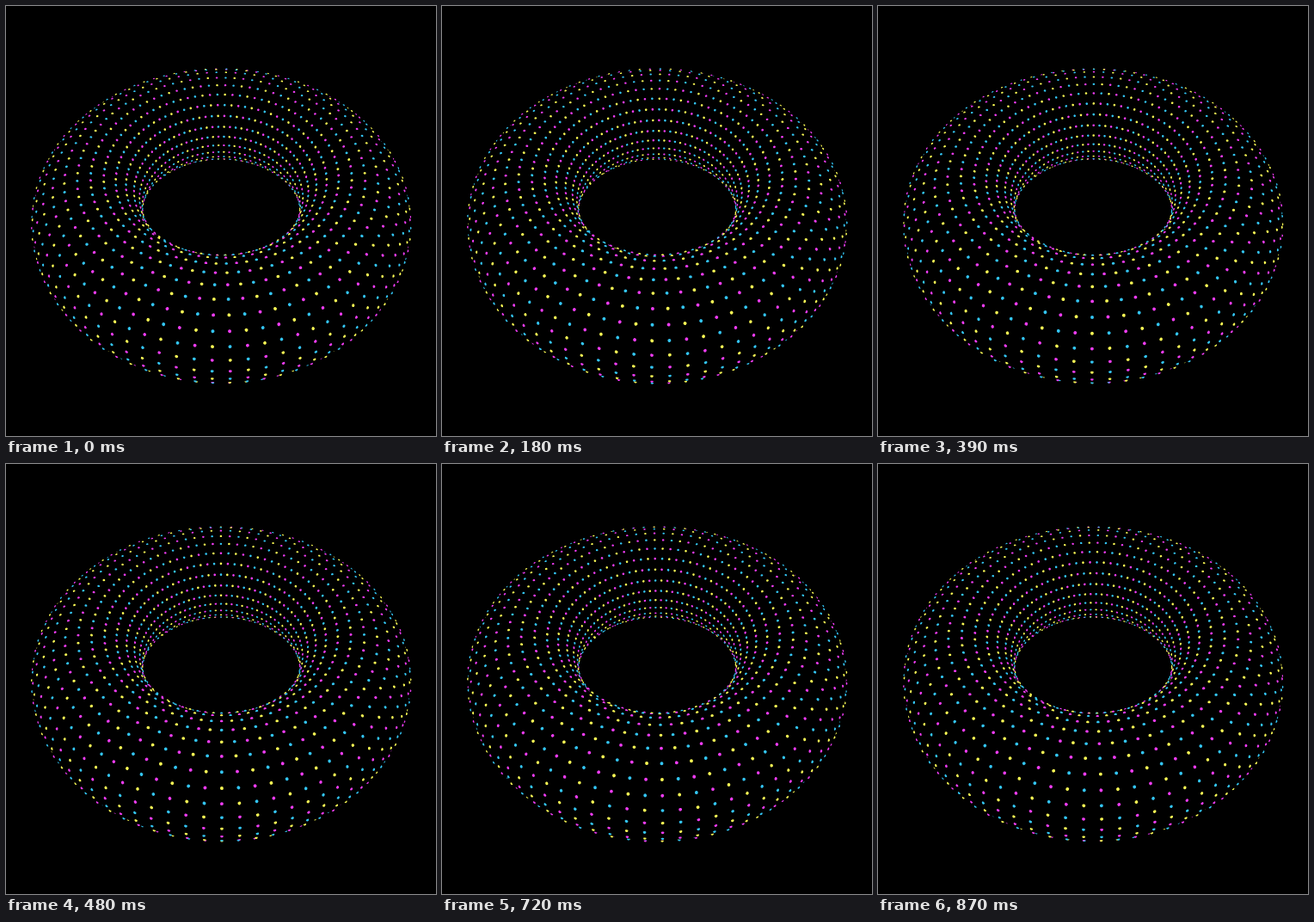
These frames come from a looping animation (500 by 500 pixels, 0.9 s). An HTML page with a canvas:

```html
<!DOCTYPE html>
<html lang="en">
<head>
<meta charset="utf-8">
<title>Dotted torus</title>
<style>
  html, body { margin: 0; width: 100%; height: 100%; overflow: hidden; background: #000; }
  canvas { display: block; width: 500px; height: 500px; }
</style>
</head>
<body>
<canvas id="stage"></canvas>
<script>
const SIZE = 500, LOOP = 900, STEP = 30;
const COLORS = ['#f03cf5', '#fafa55', '#33c6f5'];
const COLS = 84, ROWS = 28;
const RAD = Math.PI / 180, TAU = Math.PI * 2, HALF = Math.PI / 2;

// Torus with ring radius 1, seen from above by a slightly lowered lens
const TUBE = 0.392, DIST = 3.57, FOCAL = 539, BEAD = 0.0094;
const CX = 250.25, CY = 250;
const sinE = Math.sin(48.94 * RAD), cosE = Math.cos(48.94 * RAD);
const sinT = Math.sin(2.77 * RAD), cosT = Math.cos(2.77 * RAD);
const FIRST_ROW = 26.6 * RAD;

const canvas = document.getElementById('stage');
const ctx = canvas.getContext('2d');
const ratio = window.devicePixelRatio || 1;
canvas.width = canvas.height = SIZE * ratio;
ctx.scale(ratio, ratio);

// World vector to camera axes: right, up, toward the viewer
function turn(x, y, z) {
  return [x, y * sinE + z * cosE, z * sinE - y * cosE];
}

// A bead sunk halfway into the black tube; only its outer half shows
function addBead(theta, phi) {
  const ct = Math.cos(theta), st = Math.sin(theta);
  const cp = Math.cos(phi), sp = Math.sin(phi);
  const ring = 1 + TUBE * cp;
  const [x, up, near] = turn(ring * ct, ring * st, TUBE * sp);
  const [nx, nUp, nNear] = turn(cp * ct, cp * st, sp);

  const away = DIST - near;
  const facing = (away * nNear - x * nx - up * nUp) / Math.hypot(x, up, away);
  // Behind the rim, this much of the bead's radius is covered
  const covered = facing < 0 ? TUBE * (1 - Math.sqrt(1 - facing * facing)) / BEAD : 0;
  if (covered >= 1) return;

  const depth = away * cosT - up * sinT;
  const scale = FOCAL / depth;
  const sx = CX + x * scale;
  const sy = CY - (up * cosT + away * sinT) * scale;
  const r = BEAD * scale;
  const angle = Math.atan2(-nUp, nx);
  const span = Math.acos(covered);
  ctx.moveTo(sx + r * Math.cos(angle - span), sy + r * Math.sin(angle - span));
  ctx.arc(sx, sy, r, angle - span, angle + span);
  if (facing > 0) ctx.ellipse(sx, sy, r * facing, r, angle, HALF, 3 * HALF);
  ctx.closePath();
}

function draw(t) {
  ctx.fillStyle = '#000';
  ctx.fillRect(0, 0, SIZE, SIZE);
  COLORS.forEach((color, k) => {
    ctx.beginPath();
    // Rows outside this span lie on the hidden underside
    for (let row = -7; row <= 17; row++) {
      const phi = FIRST_ROW + (row + 2 * t) * TAU / ROWS;
      for (let col = 0; col < COLS; col++) {
        if ((col + row + 9) % 3 !== k) continue;
        addBead((col - 0.5 + t) * TAU / COLS - HALF, phi);
      }
    }
    ctx.fillStyle = color;
    ctx.fill();
  });
}

const start = performance.now();
let shown = -1;

function tick() {
  const time = Math.max(0, performance.now() - start) % LOOP;
  const step = Math.floor(time / STEP);
  if (step !== shown) {
    shown = step;
    draw(step * STEP / LOOP);
  }
  requestAnimationFrame(tick);
}

draw(0);
requestAnimationFrame(tick);
</script>
</body>
</html>
```
